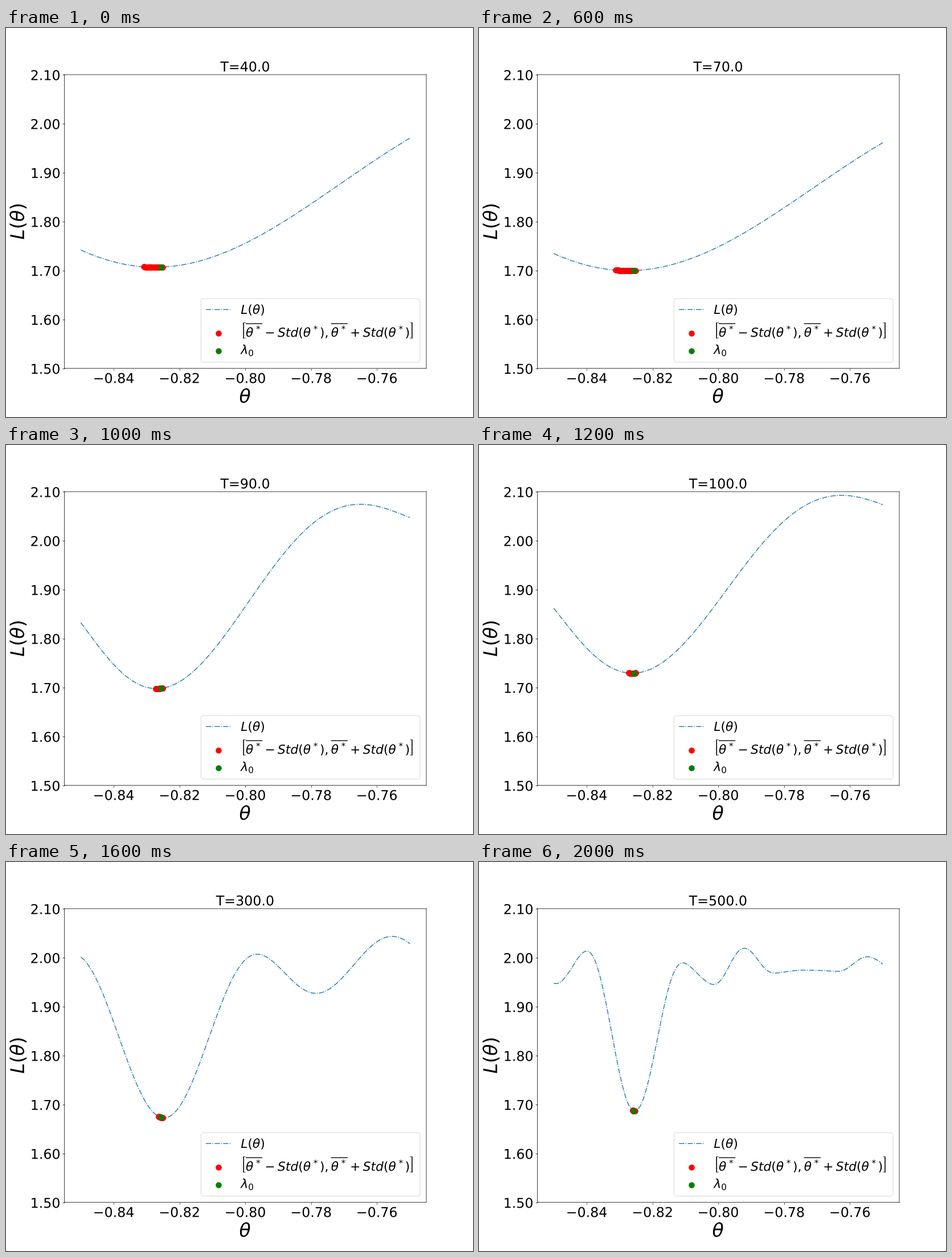
Recreate the animation shown at these times as a matplotlib script. Size 820x683 px, loop 2.2 s.

```python
import numpy as np
import matplotlib.pyplot as plt
from matplotlib.animation import FuncAnimation
from matplotlib.patheffects import Normal
from matplotlib.ticker import FormatStrFormatter, MultipleLocator

# unsnapped lines and outline text keep fractional pixel positions
plt.rcParams["path.snap"] = False
plt.rcParams["path.effects"] = [Normal()]

LAMBDA_0 = -0.8257

# curves are functions of u, thousandths of theta above -0.85
ramp = np.polynomial.Polynomial.fit(
    [0, 10, 30, 50, 70, 90, 100],
    [.1348, .0450, .0180, .1880, .3575, .3827, .3560], 6)


def valley(dip, floor, stretch, gain):
    """The same asymmetric valley, moved, widened and scaled."""
    return lambda u: floor + gain * ramp(22.6 + (u - dip) / stretch)


def waves(xs, heights):
    """Smooth wave through alternating extrema, mirrored past both ends."""
    x = np.r_[2 * xs[0] - xs[1], xs, 2 * xs[-1] - xs[-2]]
    y = np.r_[heights[1], heights, heights[-2]]
    h, d = np.diff(x), np.diff(y)
    bend = np.abs(d) / 2 * (np.pi / h) ** 2
    k = np.sqrt(np.r_[bend[0], bend] * np.r_[bend, bend[-1]])
    k *= np.sign(np.r_[d, -d[-1]])

    def curve(u):
        i = np.clip(np.searchsorted(x, u) - 1, 0, len(h) - 1)
        t = (u - x[i]) / h[i]
        rise = d[i] * t**3 * (10 - 15 * t + 6 * t**2)
        start = k[i] * t**2 * (1 - t)**3
        end = k[i + 1] * t**3 * (1 - t)**2
        return y[i] + rise + h[i]**2 / 2 * (start + end)

    return curve


def ripples(dip, width, step, heights):
    """A deep dip with evenly spaced ripples on both sides."""
    right = dip + width + step * np.arange(len(heights) - 3)
    return waves(np.r_[dip - width - step, dip - width, dip, right], heights)


def double_well(drop):
    return waves([-2.3, 25.3, 53.6, 71.5, 94.6],
                 np.array([2.007, 1.6726, 2.007, 1.927, 2.0435]) - drop)


# (T, spread of the minimum, curve)
SCENES = [
    (40, .0051, valley(23.5, 1.7079, 2.06, .926)),
    (50, .0055, valley(23.5, 1.7090, 2.06, .922)),
    (60, .0059, valley(23.5, 1.6991, 2.06, .918)),
    (70, .0055, valley(23.5, 1.7010, 2.06, .918)),
    (80, .0017, valley(22.6, 1.6760, 1.00, 1.00)),
    (90, .0016, valley(23.5, 1.6990, 1.02, .960)),
    (100, .0015, valley(24.4, 1.7305, 1.046, .926)),
    (200, .0007, double_well(.021)),
    (300, .0006, double_well(0)),
    (400, .0003, ripples(24.1, 15, 9.65, [
        2.032, 2.0645, 1.6723, 2.0645, 1.9935,
        2.0424, 2.022, 2.037, 1.998, 2.044])),
    (500, .0003, ripples(24.6, 14.6, 9.35, [
        1.947, 2.0133, 1.6866, 1.9894, 1.9452,
        2.0191, 1.9685, 1.9745, 1.972, 2.0017])),
]


def points(curve, theta):
    theta = np.atleast_1d(theta)
    return np.column_stack([theta, curve((theta + 0.85) * 1000)])


fig, ax = plt.subplots(figsize=(12, 9.9952), dpi=820 / 12)
fig.subplots_adjust(left=0.125, right=0.9, bottom=0.125, top=0.88)
ax.set_xlim(-0.855, -0.745)
ax.set_ylim(1.5, 2.1)
ax.xaxis.set_major_locator(MultipleLocator(0.02))
ax.yaxis.set_major_locator(MultipleLocator(0.1))
ax.yaxis.set_major_formatter(FormatStrFormatter("%.2f"))
ax.tick_params(labelsize=25)
ax.set_xlabel(r"$\theta$", fontsize=35)
ax.set_ylabel(r"$L(\theta)$", fontsize=35)
title = ax.set_title("", fontsize=25)

grid = np.linspace(-0.85, -0.75, 400)
line, = ax.plot([], [], "-.", color="tab:blue", label=r"$L(\theta)$")
band = ax.scatter([], [], s=100, color="red", zorder=3,
                  label=r"$\left[\overline{\theta^*}-Std(\theta^*),"
                        r"\overline{\theta^*}+Std(\theta^*)\right]$ ")
dot = ax.scatter([], [], s=100, color="green", zorder=4,
                 label=r"$\lambda_0$")
ax.legend(loc="lower right", fontsize=23, labelspacing=0.33)


def update(i):
    time, spread, curve = SCENES[i]
    span = np.linspace(LAMBDA_0 - spread, LAMBDA_0 + min(spread, .0006), 40)
    line.set_data(*points(curve, grid).T)
    band.set_offsets(points(curve, span))
    dot.set_offsets(points(curve, LAMBDA_0))
    title.set_text(f"T={time:.1f}")
    return line, band, dot, title


anim = FuncAnimation(fig, update, frames=len(SCENES), interval=200,
                     repeat=True, repeat_delay=0, blit=False)
plt.show()
```
